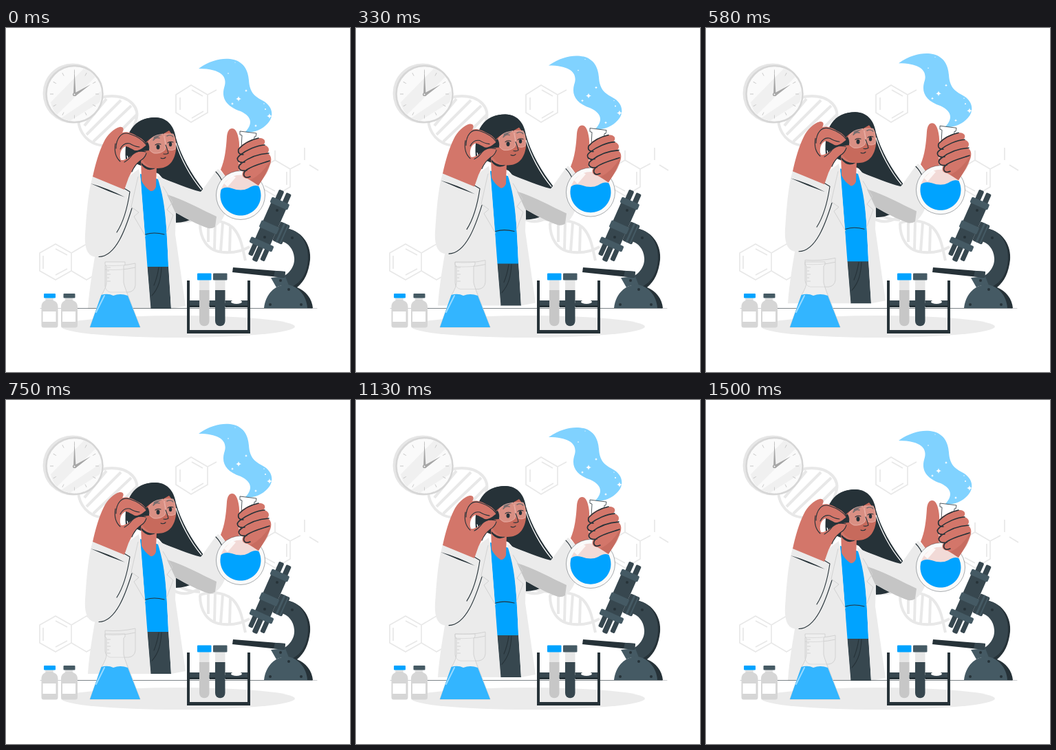
Recreate the animation shown at these times as an HTML page. Size 500 by 500 pixels, loop 1540 ms.

```html
<!DOCTYPE html>
<html lang="en">
<head>
<meta charset="utf-8">
<title>Scientist</title>
<style>
  html, body { margin: 0; height: 100%; overflow: hidden; background: #fff; }
  svg { display: block; width: 100vw; height: 100vh; }
  .ink { fill: none; stroke: #263238; stroke-width: 1.1; stroke-linecap: round; stroke-linejoin: round; }
  .bold { stroke-width: 1.6; }
  .hair-line { stroke-width: .6; }
  .faint { fill: none; stroke: #e8e8e8; stroke-width: 1.7; }
  .helix { fill: none; stroke: #e8e8e8; stroke-width: 4; }
  .seam { fill: none; stroke: #d2d2d2; stroke-width: 1; }
  .dark { fill: #263238; }
  .slate { fill: #37474f; }
  .steel { fill: #455a64; }
  .blue { fill: #00a3ff; }
  .coat { fill: #ebebeb; }
  .skin { fill: #d3766a; }
  .white { fill: #fff; }
</style>
</head>
<body>
<svg viewBox="0 0 500 500">
  <defs>
    <g id="bottle">
      <path fill="#d6d6d6" d="M6 6H17V10C21 11 24 14 24 19V46Q24 49.500 21 49.500H3Q0 49.500 0 46V19C0 14 3 11 6 10Z"/>
      <path fill="#e2e2e2" d="M6 6H17V9H6Z"/>
      <path class="white" d="M2 26H21V41H2Z"/>
    </g>
    <path id="spark" class="white" d="M0-4Q.5-.5 4 0Q.5.5 0 4Q-.5.5-4 0Q-.5-.5 0-4Z"/>
  </defs>

  <!-- DNA -->
  <path class="helix" d="M105 133C112 112 132 99 154 99C180 99 195 116 189 134C184 154 168 172 141 171C120 169 106 153 105 133M114 142L146 103M117 155L167 105M127 165L182 113M146 170L190 126M244 277C258 285 270 281 285 272M248 268C258 276 270 279 282 279"/>
  <path class="helix" d="M282 284C282 304 291 325 317 326C333 327 344 324 354 318M281 284C300 276 324 281 333 294C342 306 344 321 348 338M294 282V311M304 280L303 322M315 283L312 325M326 289L325 326"/>

  <!-- Molecules -->
  <path class="faint" d="M269 83L293 97V123L269 137L247 123V97ZM253 101V119M270 131L287 121M270 90L286 99M293 97L306 90"/>
  <path class="faint" d="M72 314L95 327V353L72 366L49 353V327ZM54 331V350M72 359L89 350M72 321L89 330M95 327L117 314L140 327V353L117 366L95 353"/>
  <path class="faint" d="M391 192L413 205V231L391 244L369 231V205ZM408 209V228M391 237L376 229M391 178V192M413 205L428 197M434 174V192M441 199L454 207"/>

  <!-- Clock -->
  <circle cx="97" cy="95" r="43.500" fill="#e6e6e6"/>
  <circle cx="99.500" cy="96" r="41" fill="#fafafa" stroke="#d6d6d6" stroke-width="2.500"/>
  <path fill="#f0f0f0" d="M65 108L113 59Q124 62 130 71L74 126Q68 120 65 108ZM80 131L138 92Q139 100 136 108L93 135Z"/>
  <circle cx="99.500" cy="96" r="33" fill="none" stroke="#c8c8c8" stroke-width="5" pathLength="12" stroke-dasharray=".05 .95" stroke-dashoffset=".025"/>
  <path fill="#a6a6a6" d="M98 97L99.500 60L101.500 97ZM99 95L123 82L101 99Z"/>
  <circle cx="99.500" cy="96.500" r="2.600" fill="#a6a6a6"/><circle cx="99.500" cy="96.500" r="1" class="white"/>

  <ellipse cx="250" cy="434" rx="170" ry="16" fill="#ebebeb"/>

  <!-- Microscope -->
  <path class="dark" d="M408 291C433 296 444 318 442 337C440 355 434 368 423 377C436 382 445 394 446 407H420L405 373C428 362 434 320 408 291Z"/>
  <path class="slate" d="M406 291C428 293 440 315 439 335C438 355 430 372 410 378L392 366L400 362C412 358 420 346 419 334C418 321 410 312 400 310Z"/>
  <path class="steel" d="M375 407C377 387 391 373 408 373C424 374 437 389 438 407Z"/>
  <path class="steel" d="M385 363L406 361L411 374Q400 373 393 377Z"/>
  <path class="dark" d="M330 348L406 354L405 363L329 355Z"/>
  <path class="slate" d="M391 353L406 354L405 363L389 361Z"/>
  <g transform="translate(403 243.500) rotate(24)">
    <g class="slate">
      <rect x="-9" y="-6" width="8" height="18" rx="2"/><rect x="2.500" y="-6" width="8" height="18" rx="2"/>
      <rect x="-12" y="15" width="24" height="60"/>
      <rect x="-12" y="80" width="7" height="19" rx="2"/><rect x="-3.500" y="80" width="8" height="24" rx="2"/><rect x="7" y="80" width="7" height="19" rx="2"/>
      <rect x="12" y="36" width="15" height="30" rx="2"/>
    </g>
    <g class="steel">
      <rect x="-14" y="8" width="28" height="9" rx="2"/><rect x="-14" y="45" width="28" height="11" rx="2"/>
      <rect x="-18" y="73" width="36" height="9" rx="2"/>
      <path d="M17 36H20V66H17ZM23 36H25V66H23Z"/>
    </g>
  </g>
  <g class="dark">
    <circle cx="394" cy="265" r="2"/><circle cx="376" cy="304" r="2"/><circle cx="416" cy="305" r="2"/>
    <circle cx="411" cy="380" r="2"/><circle cx="384" cy="402" r="2"/><circle cx="429" cy="402" r="2"/><circle cx="399" cy="367" r="2"/>
  </g>

  <g id="scientist">
    <!-- Hair behind -->
    <path class="dark" d="M174 191C171 152 186 130 217 130C237 130 245 146 247 160C254 186 270 213 287 235L283 239L266 248L274 276Q261 283 247 283L246 240L222 212L196 200Z"/>
    <path fill="none" stroke="#fff" stroke-width="1.300" d="M247 167C254 190 268 216 284 235M177 168Q175 180 177 191"/>

    <!-- Clothes -->
    <path class="slate" d="M205 345H236L240 408H210Z"/>
    <path class="ink" d="M226 348C225 365 222 378 212 389M222 348Q220 362 215 374"/>
    <path class="blue" d="M195 212L222 220C231 240 234 290 236 347H204C203 300 198 260 195 212Z"/>
    <path class="ink" d="M203 300Q215 296 230 300"/>
    <path class="coat" d="M171 232L178 216L193 205L196 222L205.500 347L210.500 408H119C121 378 127 345 133 310Z"/>
    <path class="coat" d="M219 214L240 224L247 264L246 300L261 404L240 408L233 290C231 262 228 240 219 214Z"/>
    <path class="coat" d="M222 217C245 224 265 234 283 238C290 230 298 216 308 205L330 225C336 248 325 262 318 271C311 286 304 291 295 291C279 286 262 277 246 268Z"/>
    <path fill="#c5c5c5" d="M234 242C260 250 284 264 306 274L304 289Q299 292 294 291C279 286 262 277 246 268Z"/>
    <path class="coat" d="M126 215L180 237L183 262C173 295 160 332 133 333C117 333 114 318 115 300C117 270 119 240 126 215Z"/>
    <path class="seam" d="M192 216L182 260L193 268L186 274L203 303M228 230L242 253L234 264L243 272L233 298M144 345Q166 347 188 342V374Q187 383 178 384H152Q145 383 144 375ZM144 351Q166 353 188 348"/>
    <path class="ink" d="M170 232L180 238C177 258 172 280 161 297M183 262C174 291 160 332 135 332.500M305 209Q312 216 315 225"/>
    <path class="dark" d="M123 226Q148 233 173 246Q147 237 123 226Z"/>

    <!-- Head -->
    <path class="skin" d="M196 188L219 200L218 231Q215 238 210 237Q201 231 197 222Z"/>
    <path fill="#263238" d="M197 196Q206 206 219 203Q206 211 197 199Z"/>
    <path fill="#c76a5c" d="M195 158L238 146C245 153 248 164 247 177C245 193 237 204 220 204C207 204 197 194 195 184Z"/>
    <path class="dark" d="M174 185C174 150 190 130 217 130C233 131 242 142 245 157Q240 154 237 149C229 154 221 157 214 164L215 158Q208 161 204 166Q201 170 200 178L196 192Z"/>
    <path class="ink bold" d="M214 163Q218 158 223 160M234 157Q239 154 243 158"/>
    <path fill="#f3c5bd" fill-opacity=".4" stroke="#efb9b0" stroke-width=".8" d="M206 169Q209 159 219 156L228 154Q233 165 231 177Q225 183 215 182Q207 179 206 169ZM230 154L243 154Q248 166 246 176Q239 180 233 175Z"/>
    <g class="dark">
      <ellipse cx="221" cy="173" rx="2.500" ry="3.400"/><ellipse cx="239" cy="169" rx="2.200" ry="3.200"/>
      <path d="M188 172L206 166Q209 171 208 178L188 180Z"/>
    </g>
    <path class="ink" d="M217 170Q220 167 225 169M235 167Q238 164 243 166M232 170Q235 177 236 182Q233 184 229 183M225 189Q229 191 232 188"/>

    <!-- Hand on the goggles -->
    <path class="skin" d="M126 216C130 198 135 180 142 166C147 155 157 146 165 144C171 143 172 148 169 152C176 150 184 153 190 157C197 160 202 164 204 170C199 174 194 179 187 178C183 176 179 173 174 172C167 174 164 184 167 192C173 193 179 188 184 184C190 179 198 178 203 180C205 184 202 188 196 192C188 198 183 208 178 218L172 235Z"/>
    <path class="ink" d="M160 175C160 160 168 150 180 154C189 157 198 161 204 170M159 168Q156 185 166 194M166 176Q171 166 180 168Q186 172 194 173M203 180Q190 177 183 185Q179 191 172 195M204 182Q202 189 195 193Q187 199 183 209"/>

    <!-- Smoke -->
    <path fill="#80d2ff" d="M280 59C300 45 318 43 331 46C346 50 352 62 353 76C354 93 361 99 372 105C388 113 390 128 381 138C372 148 362 152 347 152C359 140 358 129 341 121C320 114 313 102 317 87C323 71 313 59 280 59Z"/>
    <use href="#spark" x="338" y="103"/><use href="#spark" x="383" y="128"/>
    <g transform="scale(.5)">
      <use href="#spark" x="698" y="182"/><use href="#spark" x="658" y="220"/><use href="#spark" x="726" y="284"/>
    </g>
    <g class="white"><circle cx="323" cy="66" r=".8"/><circle cx="377" cy="118" r="1"/><circle cx="375" cy="110" r=".7"/><circle cx="333" cy="50" r=".6"/></g>

    <!-- Raised hand and flask -->
    <path class="skin" d="M312 206C318 192 320 175 321 158C322 147 327 144 332 147C338 152 340 168 339 180L338 205L345 222L329 229Z"/>
    <path fill="#fff" stroke="#263238" stroke-width=".8" d="M340 150L364 153L363 158L361 158L356 210H340L343 156L340 155Z"/>
    <circle cx="341" cy="243" r="35.500" fill="#fafafa" stroke="#263238" stroke-width=".4"/>
    <circle cx="341" cy="243" r="29.500" fill="#f2dad7"/>
    <path class="white" d="M317 226L329 214L334 217L322 231Z" opacity=".8"/>
    <path class="blue" d="M312.600 235Q318 230 328 233Q342 238 352 233Q361 227 367.400 230A29.500 29.500 0 1 1 312.600 235Z"/>
    <path class="skin" d="M336 180C338 170 356 160 370 160C377 161 378 166 374 170C382 171 384 177 380 182C387 185 387 195 381 204C377 214 371 223 367 229Q360 224 351 219C343 218 342 212 345 208C337 208 334 201 340 196C334 194 334 187 336 180Z"/>
    <path fill="#c2675b" d="M384 193C384 208 374 217 367 229L355 221Q372 213 384 193Z" opacity=".65"/>
    <path class="ink bold" d="M345 184Q336 184 338 176Q349 164 367 160M347 195C337 197 333 190 340 185C350 177 364 171 376 170M350 207C339 209 335 202 342 197C352 189 365 183 382 182M355 216C346 220 342 212 350 206C360 199 372 197 383 193"/>
  </g>

  <path class="ink hair-line" d="M104 407.500H445"/>
  <path class="ink hair-line" opacity=".4" d="M50 407.500H104M445 407.500H452"/>

  <!-- Bottles -->
  <use href="#bottle" x="51.500" y="386"/><use href="#bottle" x="80" y="386"/>
  <rect class="blue" x="55" y="386" width="17" height="6.500" rx="1"/>
  <rect class="steel" x="83.500" y="386" width="17" height="6.500" rx="1"/>

  <!-- Flask on the table -->
  <path fill="#fff" fill-opacity=".2" stroke="#cfcfcf" stroke-width=".9" d="M144 340H173V344L171 346V370Q172 375 177 388L195 435H122L139 388Q146 376 146 370V346L144 344Z"/>
  <path fill="#33b5ff" d="M138.500 388Q148 385 156 389Q166 385 177 389L195 435H122Z"/>
  <path class="seam" d="M147 348H152M147 353H150M147 358H152M147 363H150M147 368H152"/>
  <path d="M143 389L131 413" stroke="#99daff" stroke-width="2" stroke-linecap="round"/>

  <!-- Tube rack -->
  <path class="slate" d="M265 396H353V405H265Z"/>
  <ellipse class="white" cx="335" cy="398" rx="8" ry="3"/>
  <path fill="#e6e6e6" d="M281 365H295.500V400H281ZM304 365H318.500V400H304Z"/>
  <path fill="#c7c7c7" d="M281 381H295.500V426A7.250 7.250 0 0 1 281 426Z"/>
  <path class="slate" d="M304 381H318.500V426A7.250 7.250 0 0 1 304 426Z"/>
  <rect class="blue" x="278" y="356.500" width="20.500" height="10" rx="1"/>
  <rect class="steel" x="301" y="356.500" width="20.500" height="10" rx="1"/>
  <path class="dark" d="M263 367H267V403H281V406H267V439H351V406H319V403H351V367H355V444H263ZM296 403H304V406H296Z"/>
</svg>
<script>
  const LOOP = 1540, FLOAT = 1500, LIFT = 10;
  const scientist = document.getElementById('scientist');

  // Linear rise and fall, then a short rest before the loop restarts.
  function draw() {
    const phase = Math.min(performance.now() % LOOP / FLOAT, 1);
    const lift = LIFT * (1 - Math.abs(1 - 2 * phase));
    scientist.setAttribute('transform', `translate(0 ${-lift})`);
    requestAnimationFrame(draw);
  }
  draw();
</script>
</body>
</html>
```
